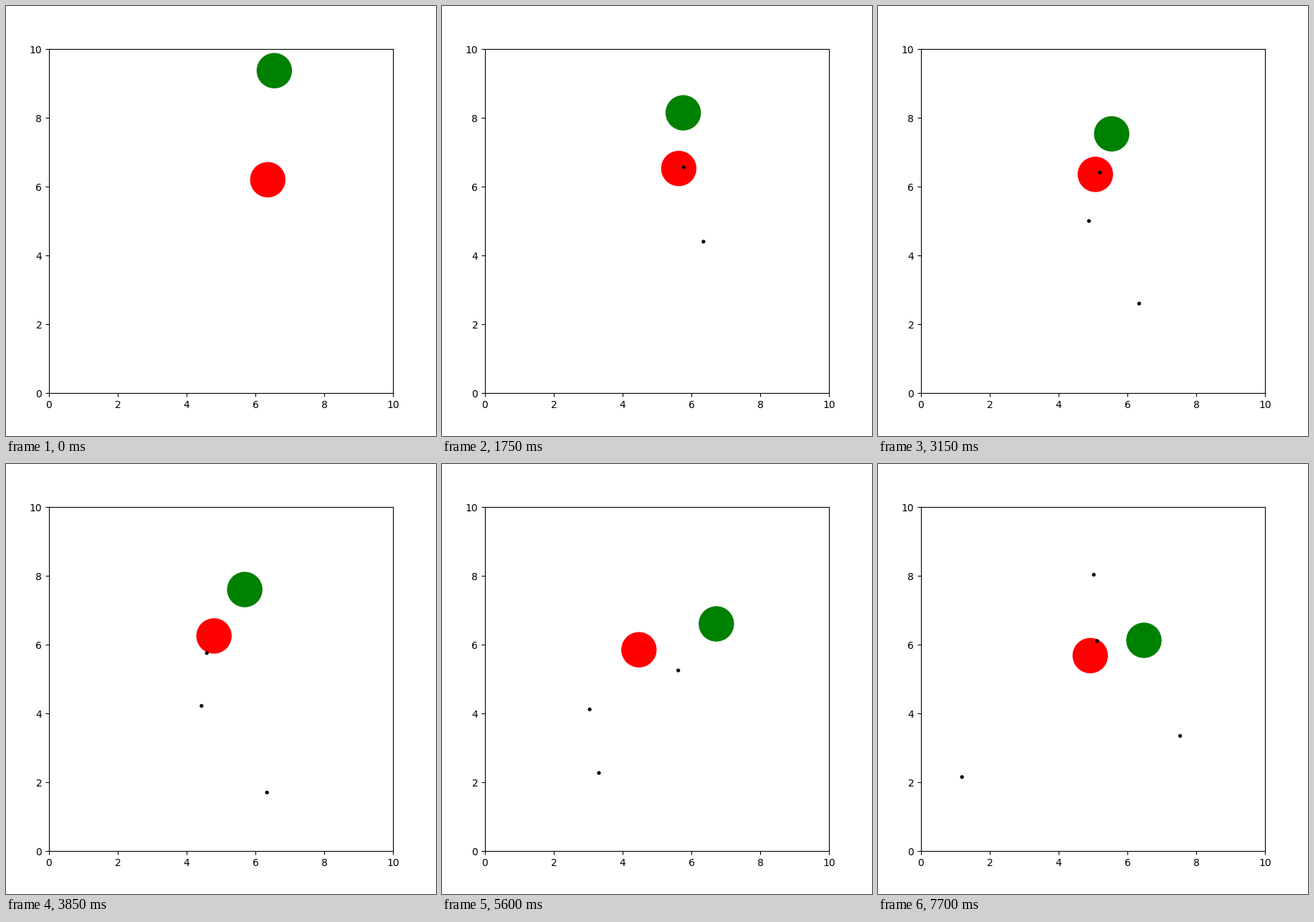
Recreate the animation shown at these times as a matplotlib script. Size 600 px wide and 600 px high, loop 8 s.

```python
import numpy as np
import matplotlib.pyplot as plt
from matplotlib.animation import FuncAnimation
from matplotlib.patches import Circle

LOOP, TICK, STEP = 8000, 50, 350  # ms
SHOT_EVERY = 4                    # steps between shots
SHOT_SPEED = 0.45                 # axis units per step
HEADINGS = np.radians([-90.3, -119.9, -133.3, -44.8, 75.9, 67.9])

# Turning points (step, x, y); each disc glides straight between them
RED = [(0, 6.36, 6.2), (4, 5.78, 6.56), (7, 5.34, 6.46), (12, 4.66, 6.2),
       (16, 4.475, 5.85), (20, 4.95, 5.69), (22, 4.92, 5.68)]
GREEN = [(0, 6.55, 9.37), (3, 6.05, 8.62), (7, 5.475, 7.67), (8, 5.47, 7.5),
         (11, 5.69, 7.6), (15, 6.6, 6.69), (17, 6.85, 6.515),
         (20, 6.785, 6.2), (22, 6.48, 6.125)]


def locate(path, step):
    t, x, y = zip(*path)
    return np.array([np.interp(step, t, x), np.interp(step, t, y)])


def shot_at(n, step):
    """Each shot leaves from where red stood one step earlier."""
    fired = n * SHOT_EVERY
    aim = np.array([np.cos(HEADINGS[n]), np.sin(HEADINGS[n])])
    return locate(RED, fired) + SHOT_SPEED * (step - fired - 1) * aim


fig = plt.figure(figsize=(6, 6), dpi=100)
ax = fig.add_axes([0.1, 0.1, 0.8, 0.8])
ax.set(xlim=(0, 10), ylim=(0, 10))


def disc(radius, color):
    return ax.add_patch(Circle((5, 5), radius, color=color))


red = disc(0.5, "red")
green = disc(0.5, "green")
shots = [disc(0.04, "black") for _ in HEADINGS]


def update(i):
    step = i * TICK // STEP
    red.center = locate(RED, step)
    green.center = locate(GREEN, step)
    for n, shot in enumerate(shots):
        shot.set_visible(step > n * SHOT_EVERY)
        shot.center = shot_at(n, step)
    return [red, green, *shots]


anim = FuncAnimation(fig, update, frames=LOOP // TICK, interval=TICK,
                     repeat=True, repeat_delay=0)
plt.show()
```
